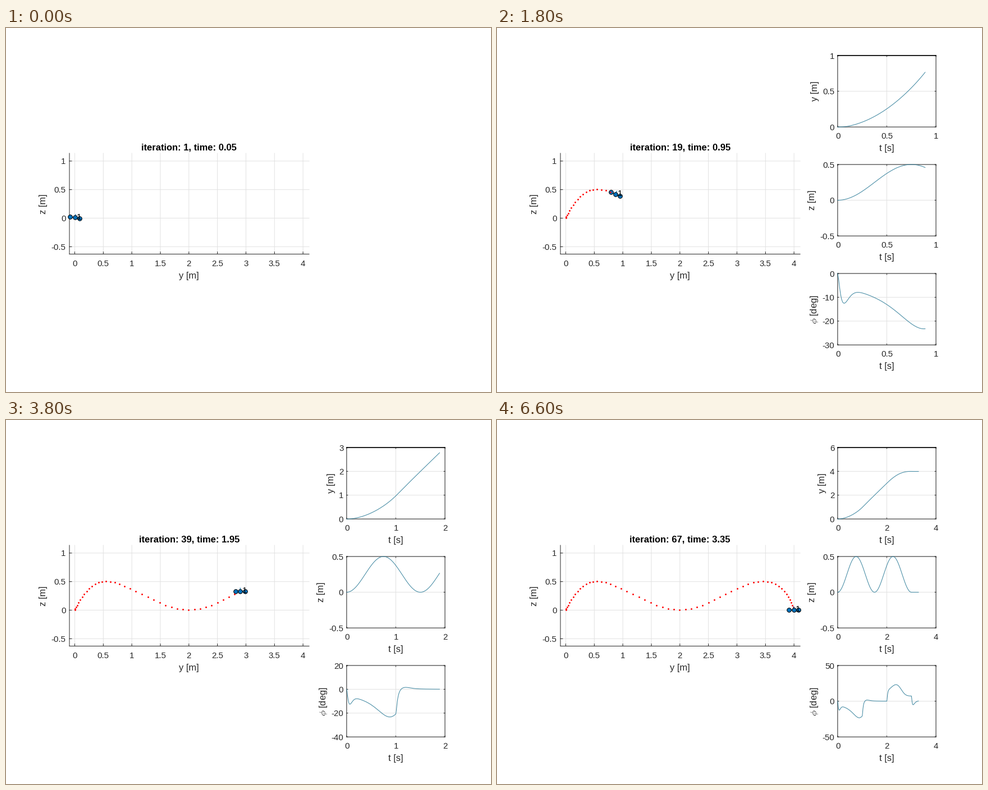
Animation of 864x648 px, one loop 6700 ms. Source, as a matplotlib script:

```python
import numpy as np
import matplotlib.pyplot as plt
from matplotlib.animation import FuncAnimation

W, H, FRAMES = 864, 648, 67
PT = 0.72  # points per pixel at 100 dpi
DARK, GRID, BLUE, CURVE = "#262626", "#e2e2e2", "#0072bd", "#3d86a0"
ORIGIN_X, ORIGIN_Y, SCALE = 122.5, 338, 101.65
ARM = 0.086
GRAVITY, OMEGA, RISE = 9.81, 2 * np.pi / 1.5, 0.25
KP, KV, FAST = 40, 12, 75  # position, velocity and roll gains

plt.rcParams.update({
    "font.family": "Liberation Sans",
    "mathtext.fontset": "cm",
    "text.kerning_factor": 16,
})

fig = plt.figure(figsize=(W / 100, H / 100), dpi=100, facecolor="white")
ax = fig.add_axes([0, 0, 1, 1])


def fly():
    """Two-metre-per-second-squared sprint, cruise and brake under PD control.

    Returns y, z and roll in degrees, sampled every 10 ms.
    """
    dt = .001
    y = v = roll = spin = ref_y = ref_v = 0.0
    log = []
    for k in range(FRAMES * 50 + 1):
        t = k * dt
        if k % 10 == 0:
            z = RISE * (1 - np.cos(OMEGA * min(t, 3)))
            log.append((y, z, np.degrees(roll)))
        acc = 2 if t < 1 else -2 if 2 <= t < 3 else 0
        lift = GRAVITY
        if t < 3:
            lift += RISE * OMEGA ** 2 * np.cos(OMEGA * t)
        goal = -(acc + KV * (ref_v - v) + KP * (ref_y - y)) / GRAVITY
        spin += dt * (FAST ** 2 * (goal - roll) - 2 * FAST * spin)
        roll += dt * spin
        v -= dt * lift * np.sin(roll)
        y += dt * v
        ref_v += dt * acc
        ref_y += dt * ref_v
    return np.array(log).T


POS_Y, POS_Z, ROLL = fly()


def text(x, y, s, size=15, ha="center", **kw):
    kw.setdefault("color", DARK)
    ax.text(x, y, s, fontsize=size * PT, ha=ha, va="baseline",
            rotation_mode="anchor", **kw)


def line(x, y, color=DARK, width=1.0):
    ax.plot(x, y, color=color, lw=width * PT, snap=False)


def dots(x, y, size, face, edge):
    ax.plot(x, y, "o", ms=size * PT, mfc=face, mec=edge, mew=PT)


def label(v):
    return f"{round(v, 6) + 0:g}"


def label_width(s):
    return 15 * sum({".": .278, "-": .333}.get(c, .556) for c in s)


def nice_ticks(lo, hi):
    """Smallest 1-2-5 step that covers the range in three intervals."""
    for exp in range(-5, 4):
        for m in (1, 2, 5):
            step = m * 10.0 ** exp
            a = int(np.floor(lo / step + 1e-6))
            b = int(np.ceil(hi / step - 1e-6))
            if b - a <= 3:
                return np.arange(a, b + 1) * step


def draw_stage(i):
    left, right, top, bottom = 113, 540, 223, 402.5
    for k in range(9):
        x = ORIGIN_X + k * SCALE / 2
        line([x, x], [top, bottom], GRID)
        line([x, x], [bottom, bottom - 4])
        text(x, bottom + 21.2, label(k / 2))
    for v in (-.5, 0, .5, 1):
        y = ORIGIN_Y + .5 - v * SCALE
        line([left, right], [y, y], GRID)
        line([left, left + 4], [y, y])
        text(left - 6.6, y + 5.2, label(v), ha="right")
    line([left, left], [top, bottom])
    line([left, right], [bottom, bottom])
    text(326, 445.7, "y [m]", 16.5)
    text(70.7, 313, "z [m]", 16.5, rotation=90)
    text(326.2, 217.7, f"iteration: {i + 1}, time: {(i + 1) * .05:.2f}", 16.5,
         weight="bold", color="black")


def draw_quad(i):
    now = 5 * (i + 1)
    px = ORIGIN_X + SCALE * POS_Y[:now + 1:5]
    py = ORIGIN_Y - SCALE * POS_Z[:now + 1:5]
    x, y = px[-1], py[-1]
    a = np.radians(ROLL[now])
    dx, dy = SCALE * ARM * np.cos(a), -SCALE * ARM * np.sin(a)
    ends_x, ends_y = [x - dx, x + dx], [y - dy, y + dy]
    line(ends_x, ends_y, "black")
    dots(ends_x, ends_y, 7.6, BLUE, "black")
    ax.plot(px, py, "o", ms=2.9 * PT, mfc="red", mec="none")
    line([x, x - 5.5 * np.sin(a)], [y, y - 5.5 * np.cos(a)], BLUE, 1.2)
    dots([x], [y], 7.6, BLUE, "black")
    text(x + 7.5, y + 3.2, "1", color="black")


def draw_plot(row, left, t, values, t_ticks, ticks, labels, name):
    top, right = 49 + 194 * row, 782
    bottom = top + 127.2

    def sx(v):
        return left + (right - left) * v / t_ticks[-1]

    def sy(v):
        return bottom - (bottom - top) * (v - ticks[0]) / (ticks[-1] - ticks[0])

    for v in t_ticks:
        x = sx(v)
        line([x, x], [top, bottom], GRID)
        line([x, x], [bottom, bottom - 2])
        line([x, x], [top, top + 2])
        text(x + .3, bottom + 21, label(v))
    for v, s in zip(ticks, labels):
        y = sy(v)
        line([left, right], [y, y], GRID)
        line([left, left + 2], [y, y])
        line([right, right - 2], [y, y])
        text(left - 5.6, y + 5.6, s, ha="right")
    line([left, right, right, left, left], [top, top, bottom, bottom, top])
    if row == 0:
        line([left, right], [top, top], "black", 1.5)
    line(sx(t), sy(values), CURVE)
    text((left + right) / 2 + .3, bottom + 43, "t [s]", 16.5)
    edge = left - 6 - max(map(label_width, labels))
    text(edge - 9, (top + bottom) / 2, name, 16.5, rotation=90)


def draw_plots(i):
    count = 5 * i
    t = np.arange(count) * .01
    t_ticks = nice_ticks(0, t[-1])
    rows = []
    for name, track in (("y [m]", POS_Y), ("z [m]", POS_Z),
                        (r"$\phi$ [deg]", ROLL)):
        v = track[:count]
        ticks = nice_ticks(v.min(), v.max() * 1.001)
        # A peak right on the half-metre mark gets a mirrored range
        if track is POS_Z and v.max() > .4995:
            ticks = np.array([-.5, 0, .5])
        size = np.floor(np.log10(np.abs(ticks).max()) + 1e-9)
        exp = int(size) if size < -2 else 0
        labels = [label(k / 10.0 ** exp) for k in ticks]
        rows.append((v, ticks, labels, name, exp))

    # The widest tick label pushes all three left edges
    left = 581 + max(label_width(s) for r in rows for s in r[2])
    for k, (v, ticks, labels, name, exp) in enumerate(rows):
        draw_plot(k, left, t, v, t_ticks, ticks, labels, name)
        if exp:
            text(left, 44 + 194 * k, rf"$\times\mathdefault{{10^{{{exp}}}}}$",
                 ha="left")


def draw(i):
    ax.clear()
    ax.set(xlim=(0, W), ylim=(H, 0))
    ax.axis("off")
    draw_stage(i)
    draw_quad(i)
    if i:
        draw_plots(i)
    return []


anim = FuncAnimation(fig, draw, frames=FRAMES, interval=100, repeat=True,
                     cache_frame_data=False)
plt.show()
```
